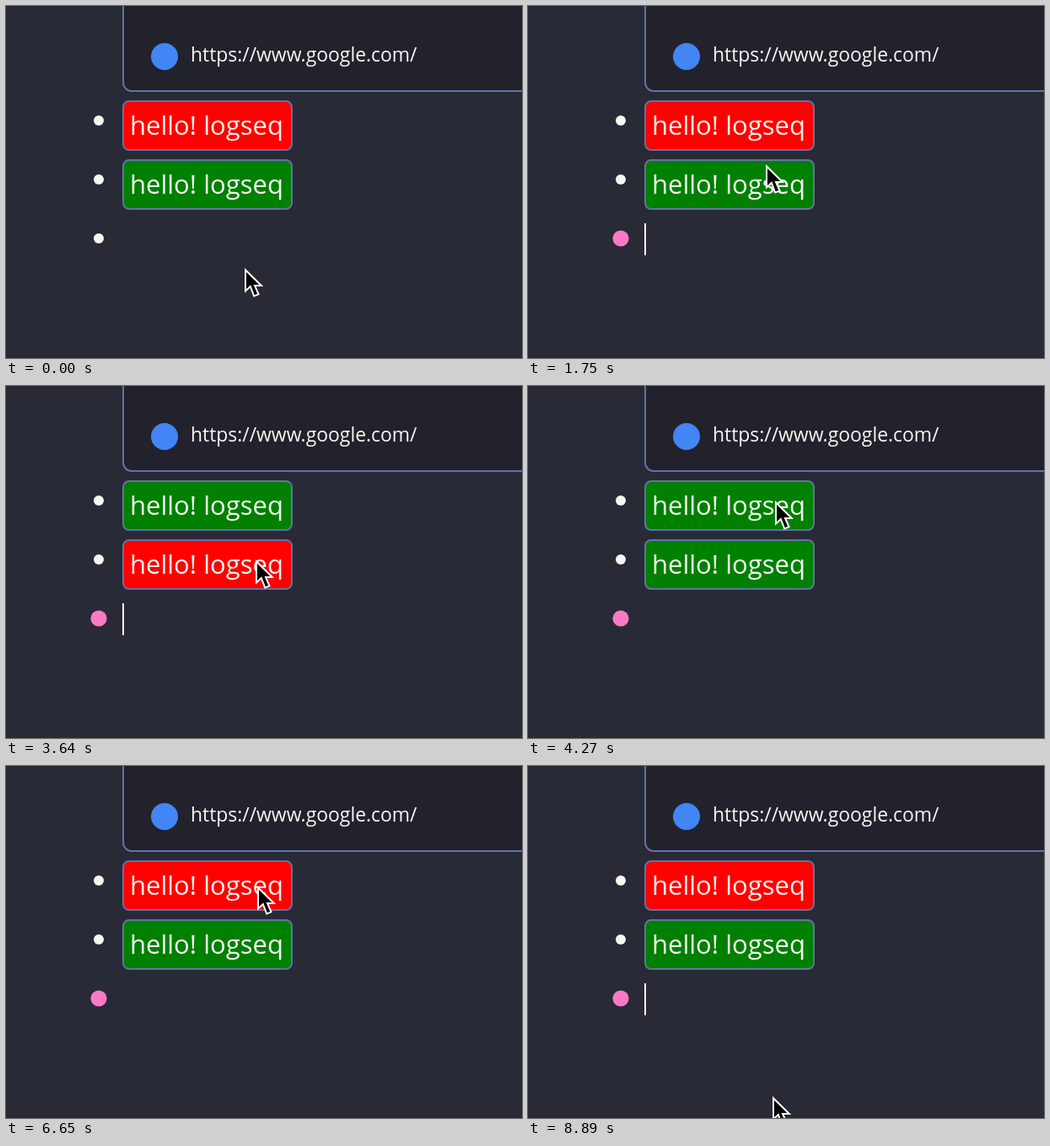
Recreate the animation shown at these times as an HTML page. Size 612 by 418 pixels, loop 8.96 s.

```html
<!DOCTYPE html>
<html lang="en">
<head>
<meta charset="utf-8">
<title>Toggle buttons</title>
<style>
  html, body { margin: 0; width: 100%; height: 100%; overflow: hidden; background: #282a36; }
  svg { display: block; width: 612px; height: 418px; }
  text { font-family: "Open Sans", "Noto Sans", sans-serif; fill: #f8f8f2; }
  .box { stroke: #6272a4; stroke-width: 2; }
  .label { font-size: 31px; }
  .link { font-size: 22.9px; }
  .dot { fill: #f8f8f2; }
</style>
</head>
<body>
<svg viewBox="0 0 612 418">
  <rect class="box" x="139" y="-20" width="500" height="121" rx="10" fill="#21222c"/>
  <circle cx="188" cy="60" r="16" fill="#4285f4"/>
  <text class="link" x="219" y="66">https://www.google.com/</text>

  <g id="row">
    <circle class="dot" cx="110" cy="136" r="6"/>
    <rect class="box" x="139" y="113" width="200" height="58" rx="7"/>
    <text class="label" x="147" y="153">hello! logseq</text>
  </g>

  <circle id="bullet" cx="110" cy="276"/>
  <rect id="caret" x="138" y="258" width="2" height="38" fill="#f8f8f2"/>
  <path id="pointer" d="M1 2.5V27.5L6.8 22L11.2 33.5L16.5 31.3L12 21H19.8Z"
        fill="#000" stroke="#fff" stroke-width="2"/>
</svg>
<script>
const LOOP = 8960, STEP = 70;
const MOVE = 350, CLICK_DELAY = 280;
const FOCUS = 1260, BLINK_START = 4190, BLINK = 520;
const COLORS = ["#ff0000", "#008000"];
const [row, bullet, caret, pointer] =
  ["row", "bullet", "caret", "pointer"].map(id => document.getElementById(id));

// The second row repeats the first, 70px lower
const copy = row.cloneNode(true);
copy.removeAttribute("id");
copy.setAttribute("transform", "translate(0 70)");
row.after(copy);
const buttons = [row, copy].map(r => r.querySelector("rect"));

// Pointer moves: start time, destination, and the button clicked there
const home = { x: 283, y: 311 };
const moves = [
  { at: 840, x: 284, y: 276 },
  { at: 1400, x: 282, y: 188, click: 1 },
  { at: 2590, x: 287, y: 134, click: 0 },
  { at: 3220, x: 296, y: 206, click: 1 },
  { at: 3920, x: 293, y: 136, click: 0 },
  { at: 4550, x: 299, y: 212, click: 1 },
  { at: 5040, x: 299, y: 212, click: 1 },
  { at: 5670, x: 298, y: 142 },
  { at: 7700, x: 298, y: 212 },
  { at: 8540, x: 290, y: 392 }
];

const ease = p => p * p * (3 - 2 * p);

function pointerAt(t) {
  let { x, y } = home;
  for (const m of moves) {
    const p = ease(Math.min(1, Math.max(0, (t - m.at) / MOVE)));
    x += (m.x - x) * p;
    y += (m.y - y) * p;
  }
  return [x, y];
}

function clicksOn(button, t) {
  return moves.filter(m => m.click === button && t >= m.at + MOVE + CLICK_DELAY).length;
}

// Solid while the pointer is busy, then blinking, off phase first
function caretOn(t) {
  return t >= FOCUS && (t < BLINK_START || Math.floor((t - BLINK_START) / BLINK) % 2 === 1);
}

function draw(t) {
  const focused = t >= FOCUS;
  buttons.forEach((b, i) => b.setAttribute("fill", COLORS[(i + clicksOn(i, t)) % 2]));
  bullet.setAttribute("r", focused ? 9.6 : 6);
  bullet.setAttribute("fill", focused ? "#ff79c6" : "#f8f8f2");
  caret.setAttribute("visibility", caretOn(t) ? "visible" : "hidden");
  pointer.setAttribute("transform", `translate(${pointerAt(t)})`);
}

const start = performance.now();
function tick() {
  const t = (performance.now() - start) % LOOP;
  draw(Math.floor(t / STEP) * STEP);
  requestAnimationFrame(tick);
}
tick();
</script>
</body>
</html>
```
